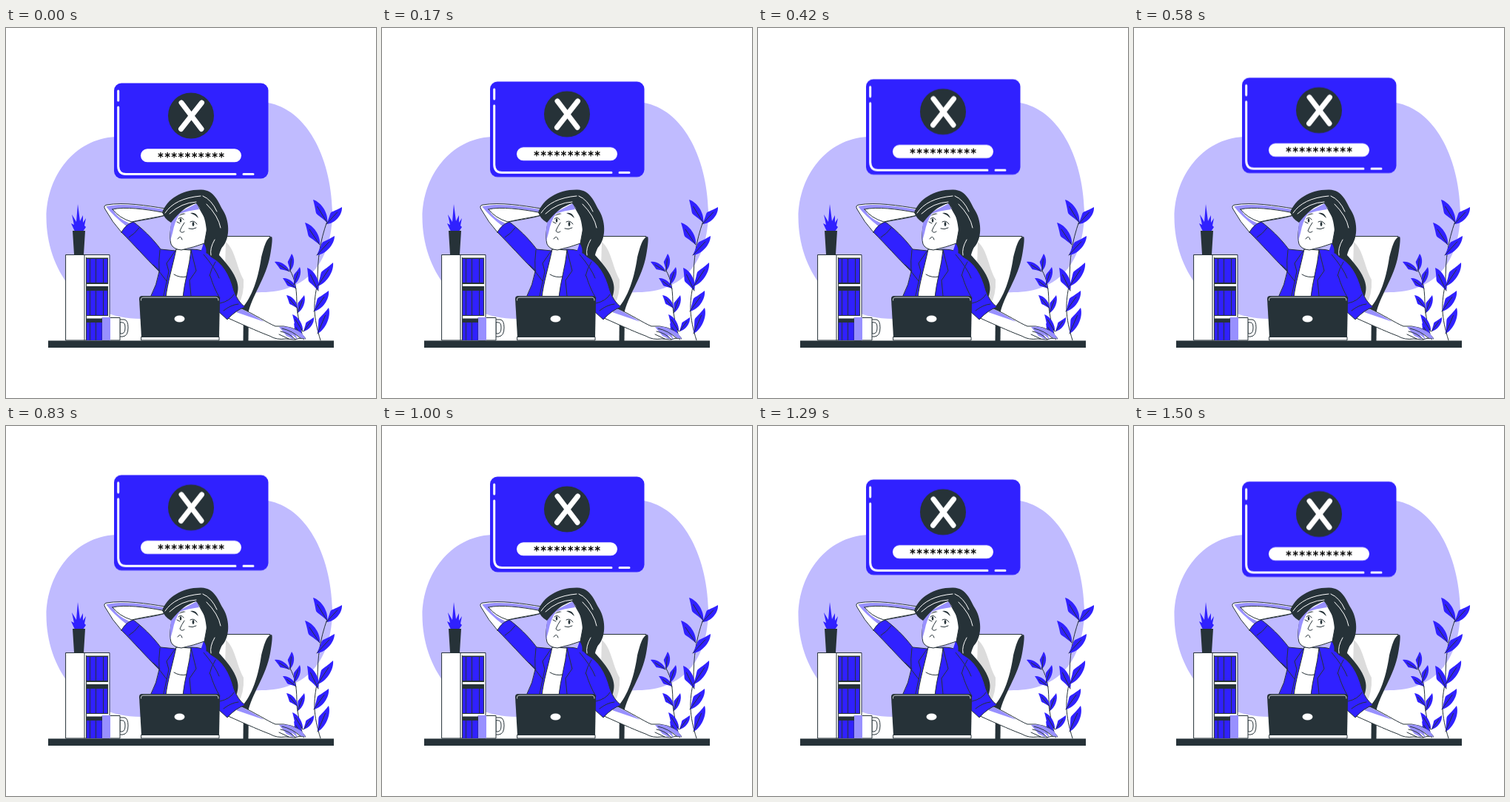
Animation of 500 by 500 pixels, one loop 1540 ms. Source, as an HTML page:

```html
<!DOCTYPE html>
<html lang="en">
<head>
<meta charset="utf-8">
<title>Access denied</title>
<style>
  html, body { margin: 0; width: 100%; height: 100%; overflow: hidden; background: #fff; }
  svg { display: block; width: 100vw; height: 100vh; }
  .blue { fill: #3021ff; }
  .tint { fill: #c0bbff; }
  .shade { fill: #9890ff; }
  .dark { fill: #263238; }
  .white { fill: #fff; }
  .line { fill: none; }
  .ink { stroke: #263238; stroke-width: 1; stroke-linecap: round; stroke-linejoin: round; }
  .glint { fill: none; stroke: #fff; stroke-linecap: round; }
  .mask { font: bold 15px "DejaVu Sans", sans-serif; letter-spacing: 1.3px; fill: #000; }
  #card { animation: float 1540ms linear infinite; }
  @keyframes float {
    0%, 100% { transform: translateY(0); }
    48.2% { transform: translateY(-9.5px); }
    97.4% { transform: translateY(.5px); }
  }
</style>
</head>
<body>
<svg viewBox="0 0 500 500">
  <path class="tint" d="M148 147C92 150 55 200 54.5 256C55 325 98 393 183 393C250 393 290 357 346 357C405 357 441 318 441 248C439 172 405 110 354 101C300 92 260 140 210 150C185 150 168 146 148 147Z"/>

  <g id="shelf">
    <path class="white ink" d="M81 306.5H140V422H81Z"/>
    <path class="dark" d="M108 310H138V422H108Z"/>
    <path class="ink line" d="M106 307V422"/>
    <g id="books"></g>
    <path class="white" d="M109 307H138V310.5H109ZM109 346H138V349H109ZM109 389H138V392.5H109Z"/>
  </g>

  <g id="pot">
    <path class="blue" d="M93 275L88 264L92 266L89 252L95 262L97 238L100 261L104 253L104 263L108 257L106 267L108 269L104 275Z"/>
    <path class="dark" d="M90 274H107L105 306H92Z"/>
  </g>

  <g id="mug">
    <path class="white ink" d="M153 394H160Q165 395 165 405Q165 416 158 417H153ZM154 398V413H157Q161 412 161 405Q161 398 158 398Z"/>
    <path class="white ink" d="M130.500 391.500H154V422H130.500Z"/>
    <path class="shade" d="M130 391H141V422H130Z"/>
  </g>

  <g id="chair">
    <path class="white ink" d="M285 281.500H357C350 300 348 350 318 382L290 376Z"/>
    <path fill="#dcdcdc" d="M297 289C310 300 311 322 321 340Q322 360 314 374L295 360Z"/>
    <path class="dark" d="M359 282C352 283 349 295 345 310C340 344 330 368 316 382L327 387C331 364 352 337 357 307Q361 284 359 282Z"/>
    <path class="dark" d="M321 381L328 382L327.500 423H320.500Z"/>
  </g>

  <g id="plants"></g>

  <g id="woman">
    <path class="dark" d="M262 240L299 262C299 286 290 297 288 307C300 320 317 340 313 357Q312 365 306 369L270 330Z"/>

    <path class="white ink" d="M215 244C190 240 160 235 136 239Q131 240 134 245Q144 263 156 276L171 262C187 259 203 257 216 253Z"/>
    <path class="shade" d="M135 241C160 236 190 241 213 245L211 249C190 244 160 241 144 245Q150 257 167 264L163 268Q145 254 135 241Z"/>
    <path class="white ink" d="M144 245C160 241 190 245 211 249L215 253C203 256 187 258 170 262Q153 257 144 245Z"/>

    <path class="white ink" d="M318 379C336 387 352 398 364 403Q376 402 385 405Q398 409 405 420L398 419L390 421L378 420Q366 422 356 416Q342 411 298 391Z"/>
    <path class="shade" d="M317 379C331 386 340 391 349 397L311 384ZM369 404Q381 402 389 407Q400 410 405 420L399 419L391 413L394 421L386 414L389 421L379 416Z"/>
    <path class="ink line" d="M373 406Q387 409 399 420M371 410Q383 412 391 421M369 414L382 420"/>

    <path class="blue ink" d="M156 276Q162 265 172 262C183 270 198 284 209 299L229 301L251 299Q269 299 277 309C293 318 302 332 308 355Q313 370 323 377Q311 381 299 394L288 384V364H195Q204 347 207 329C187 309 174 294 156 276Z"/>
    <path class="white ink" d="M230 299L250 300C248 322 241 343 239 364H216C218 345 225 323 230 299Z"/>
    <path class="ink line" d="M227 333Q235 338 244 336M208 300Q206 315 207 329L217 342M267 306Q283 325 288 338M276 335Q281 352 289 365M289 372Q303 369 308 360M294 382Q304 374 314 373M250 300L257 328L248 341L250 362M166 283Q174 278 180 270M228 302L217 318L220 329L213 362M208 328L199 320M283 316Q277 326 275 335"/>

    <path class="white ink" d="M228 250C223 265 220 281 223 292Q226 299 237 300Q255 296 268 291L273 264L257 236Z"/>
    <path class="shade" d="M225 254L258 237L261 245Q245 247 235 251Q228 261 225 277L222 288Q221 270 225 254Z"/>
    <path class="dark" d="M211 249C218 231 238 218 264 218.500C282 219 287 236 293 246C302 260 303 282 294 294Q286 302 286 313Q272 310 271 293C272 280 272 252 257 237Q240 241 223 263Q214 258 211 249Z"/>
    <path class="blue" d="M267 291Q272 297 270 306Q263 307 264 300Z"/>
    <path class="glint" stroke-width="1" d="M215 250Q228 230 263 227M221 251Q237 236 257 235M266 227Q278 232 285 248M271 238Q287 254 290 270M282 286Q275 298 277 307"/>
    <path class="ink line" stroke-width=".9" d="M241 263Q237 269 235 274Q237 278 241 275M232 285Q236 279 238 286M247 271Q252 273 257 270M231 262L235 264"/>
    <path class="dark" d="M233 254Q238 249 243 251Q237 252 233 254ZM249 250Q257 248 260 257Q255 252 249 250Z"/>
    <ellipse class="dark" cx="236" cy="260" rx="1.300" ry="2.800"/>
    <ellipse class="dark" cx="253" cy="265" rx="1.400" ry="3"/>
    <path class="ink line" d="M233 258Q237 254 240 259M249 262Q254 259 258 265"/>
  </g>

  <g id="laptop">
    <path class="dark" d="M184 362H285Q289 362 289 366L288 418H183L180 366Q180 362 184 362Z"/>
    <path class="glint" stroke-width=".8" d="M182.500 368Q182 364 186 364H284Q287 364 287 368"/>
    <path class="white ink" d="M183 417.500H288V422H183Z"/>
    <ellipse class="white" cx="234.500" cy="393" rx="7" ry="4.500"/>
  </g>

  <path class="dark" d="M57 422.500H443V432H57Z"/>

  <g id="card">
    <rect class="blue" x="146" y="74.500" width="208.500" height="129" rx="10"/>
    <path class="glint" stroke-width="3" d="M151.700 85V98M151.700 107V187Q152 197.500 162 197.500H310M321 197.500H334"/>
    <circle class="dark" cx="250" cy="118.500" r="31"/>
    <path class="glint" stroke-width="7" d="M237 101L264 136.500M264.500 101L236.500 136.500"/>
    <rect class="white" x="182" y="163.300" width="136" height="18" rx="9"/>
    <text class="mask" x="205" y="180.300">**********</text>
  </g>
</svg>
<script>
  const el = id => document.getElementById(id);

  // Leaf from its base to its tip, bulging to both sides
  function leaf(x, y, tx, ty, width) {
    const dx = tx - x, dy = ty - y, len = Math.hypot(dx, dy);
    const nx = -dy / len * width, ny = dx / len * width;
    const side = s =>
      `${x + dx * .25 + nx * s} ${y + dy * .25 + ny * s} ${x + dx * .75 + nx * s} ${y + dy * .75 + ny * s}`;
    return `<path class="blue" d="M${x} ${y}C${side(1)} ${tx} ${ty}C${side(-1)} ${x} ${y}"/>
      <path class="ink line" stroke-width=".5" d="M${x} ${y}L${x + dx * .7} ${y + dy * .7}"/>`;
  }

  const stem = d => `<path class="ink line" d="${d}"/>`;

  const tall = [
    [434, 263, 415, 232], [433, 265, 454, 242], [424, 293, 404, 263],
    [420, 307, 444, 281], [422, 355, 407, 324], [421, 349, 442, 317],
    [416, 383, 436, 355], [421, 413, 436, 378]
  ];
  const small = [
    [384, 328, 386, 305], [383, 329, 363, 316], [392, 352, 374, 338],
    [389, 347, 397, 323], [394, 379, 379, 361], [394, 385, 403, 361],
    [401, 410, 387, 387], [402, 410, 416, 391], [399, 418, 389, 399]
  ];
  el('plants').innerHTML =
    stem('M434 261C424 290 421 310 421 345C415 372 415 390 425 422') +
    stem('M383 326C392 341 393 356 393 377Q395 396 402 421') +
    tall.map(p => leaf(...p, 8)).join('') +
    small.map(p => leaf(...p, 5.5)).join('');

  // Three rows of books
  const rows = [[312, 32], [355, 33], [398, 24]];
  const widths = [4, 7, 9, 5];
  el('books').innerHTML = rows.map(([y, h]) => {
    let x = 109;
    return widths.map(w => {
      const book = `<rect class="blue" x="${x}" y="${y}" width="${w}" height="${h}"/>`;
      x += w + 1;
      return book;
    }).join('');
  }).join('');
</script>
</body>
</html>
```
